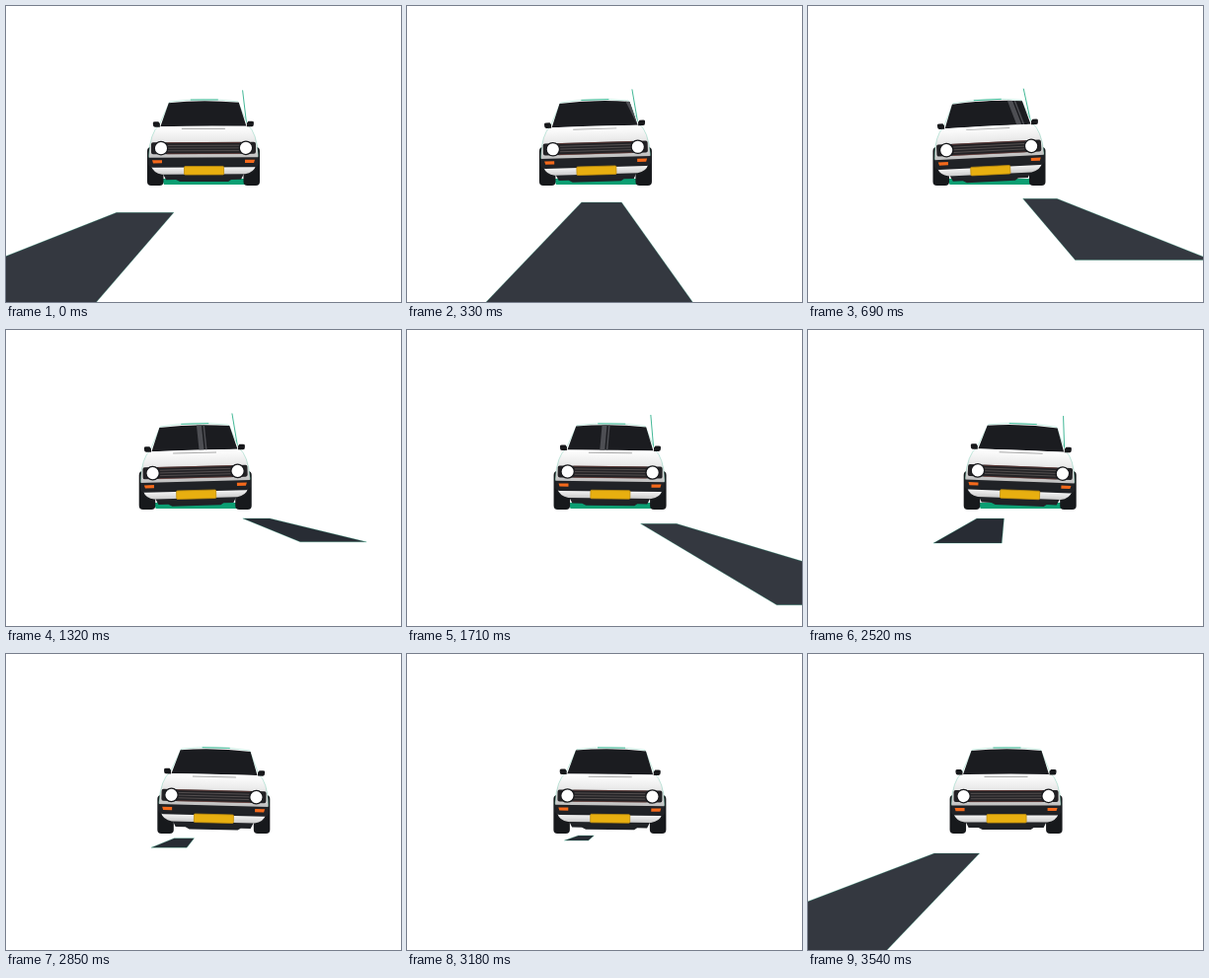
An HTML page for the animation above (3570 ms loop, 400x300 px).

```html
<!DOCTYPE html>
<html lang="en">
<head>
<meta charset="utf-8">
<title>Swaying car</title>
<style>
  html, body { margin: 0; width: 100%; height: 100%; overflow: hidden; background: #fff; }
  svg { display: block; width: 100vw; height: 100vh; }
</style>
</head>
<body>
<svg viewBox="0 0 400 300">
  <defs>
    <linearGradient id="paint" x1="0" y1="0" x2="0" y2="1">
      <stop offset=".45" stop-color="#fff"/>
      <stop offset=".78" stop-color="#e2e2e2"/>
      <stop offset="1" stop-color="#bbb"/>
    </linearGradient>
    <linearGradient id="lip" x1="0" y1="0" x2="0" y2="1">
      <stop offset="0" stop-color="#fff"/>
      <stop offset="1" stop-color="#c9c9c9"/>
    </linearGradient>
    <clipPath id="glass"><path d="M-35 98Q0 94.500 36 98L43.500 122Q0 121.200 -43.500 122Z"/></clipPath>
    <path id="mirror" d="M51 118Q51 117 49 117H45.500L44 119V122.500H49Q51 122.500 51 120Z" fill="#17181b"/>
    <rect id="wheel" x="40.500" y="143" width="16.500" height="39" rx="4" fill="#17191c"/>
    <circle id="lamp" cx="43" cy="144" r="6.700" fill="#fff" stroke="#17181b" stroke-width="1.300"/>
    <path id="signal" d="M52 156H42V159.200H51Z" fill="#f4691b"/>
  </defs>

  <g id="road" stroke="#16a77e" stroke-width=".5" stroke-opacity=".5"></g>

  <g id="car">
    <path id="shadow" d="M-42 175H43V181H-40Z" fill="#0a9f73"/>
    <use href="#wheel"/><use href="#wheel" transform="scale(-1 1)"/>
    <g id="body">
      <path d="M-42 168H42L38 176H28L25 178H-24L-28 176H-38Z" fill="#202226"/>
      <path id="antenna" fill="none" stroke="#16a77e" stroke-width=".8"/>
      <path d="M-34 97Q0 92.500 35 97L45 121Q54 128 55.500 152L55 155H-55L-55.500 152Q-54 128 -45 121Z"
            fill="url(#paint)" stroke="#16a77e" stroke-opacity=".5" stroke-width=".5"/>
      <path d="M-13 95H15" stroke="#16a77e" stroke-width=".8"/>
      <g clip-path="url(#glass)">
        <rect x="-50" y="90" width="100" height="35" fill="#1b1c20"/>
        <path id="glint" fill="#4d4e53"/>
      </g>
      <path d="M-22 124.500H22" stroke="#aaa"/>
      <use href="#mirror"/><use href="#mirror" transform="scale(-1 1)"/>

      <rect x="-53" y="138" width="106" height="12" rx="2" fill="#242326"/>
      <path d="M-36 141.300H36M-36 144H36M-36 146.700H36" stroke="#67605f" stroke-width=".7"/>
      <path d="M-37 138.500H37M-37 149.700H37" stroke="#7d4640" stroke-width=".6"/>
      <use href="#lamp"/><use href="#lamp" transform="scale(-1 1)"/>

      <path d="M-53 162H53Q51 169 42 170.500H-42Q-51 169 -53 162Z" fill="url(#lip)"/>
      <path d="M-56 153.500H56V160Q55 163.500 51 163.500H-51Q-55 163.500 -56 160Z" fill="#202226"/>
      <use href="#signal"/><use href="#signal" transform="scale(-1 1)"/>
      <rect x="-19.500" y="162.500" width="40" height="8.500" rx="1" fill="#e8af10" stroke="#c08e0c" stroke-width=".8"/>
    </g>
  </g>
</svg>

<script>
const LOOP = 3570, LAP = .926;
const $ = id => document.getElementById(id);

// Key poses: time, car position, bend of the road, depth travelled.
const poses = [
  [0, 200, -1.7, 0],
  [690, 183.5, 1.68, .212],
  [1320, 191.7, 3.26, .315],
  [2070, 217.2, 1.26, .571],
  [2520, 214.7, -.92, .663],
  [3180, 205.4, -1.95, .85],
];

// Smooth looping curve through one column of the poses; `gain` is its rise per loop.
function curve(col, gain = 0) {
  const n = poses.length;
  const at = i => {
    const turn = Math.floor(i / n), pose = poses[i - turn * n];
    return [pose[0] + turn * LOOP, pose[col] + turn * gain];
  };
  const slope = i => {
    const [t0, v0] = at(i - 1), [t1, v1] = at(i + 1);
    return (v1 - v0) / (t1 - t0);
  };
  return t => {
    let i = n - 1;
    while (poses[i][0] > t) i--;
    const [t0, v0] = at(i), [t1, v1] = at(i + 1);
    const d = t1 - t0, u = (t - t0) / d, w = 1 - u;
    return v0 * w * w * (1 + 2 * u) + v1 * u * u * (3 - 2 * u)
      + d * u * w * (w * slope(i) - u * slope(i + 1));
  };
}
const carX = curve(1), bend = curve(2), travel = curve(3, LAP);

// Road: depth is the inverse of the distance below the horizon.
const COUNT = 8, FIRST = .029, DASH = .0362, HALF = .833, FAR = .12, HORIZON = 174.5;
const dashes = Array.from({ length: COUNT + 1 }, (_, i) => {
  const el = document.createElementNS("http://www.w3.org/2000/svg", "path");
  $("road").append(el);
  return { pos: FIRST + i * LAP / COUNT, el };
});

function dashPath(depth, k) {
  const top = 1 / depth, low = 1 / Math.max(depth - DASH, .0015);
  const p = (dy, side) => `${200 + dy * (k + side * HALF)} ${HORIZON + dy}`;
  return `M${p(top, -1)}L${p(top, 1)}L${p(low, 1)}L${p(low, -1)}Z`;
}

function stripe(x, lean, width) {
  return `M${x} 94h${width}L${x + lean + width} 123h${-width}Z`;
}

function draw(t) {
  const k = bend(t), gone = travel(t);
  for (const { pos, el } of dashes) {
    const depth = pos - gone;
    el.setAttribute("d", depth > .004 && depth < FAR ? dashPath(depth, k) : "");
    el.setAttribute("fill", depth > .055 ? "#282c34" : "#343840");
  }

  const x = carX(t), roll = (x - 201.3) * .16;
  $("car").setAttribute("transform", `translate(${x} 0)`);
  $("body").setAttribute("transform", `rotate(${roll} 0 150)`);

  const lit = t < 2730;
  $("antenna").setAttribute("d", lit ? `M44 122L${40 + roll * .7} 85.5` : "");
  $("shadow").setAttribute("opacity", lit ? 1 : 0);

  const g = 50 - t * .033, left = g * .85 - 3, lean = g * .35;
  $("glint").setAttribute("d", t < 2400 ? stripe(left, lean, 5) + stripe(left + 6.5, lean, 1.5) : "");
}

function tick(now) {
  draw(now % LOOP);
  requestAnimationFrame(tick);
}
draw(0);
requestAnimationFrame(tick);
</script>
</body>
</html>
```
